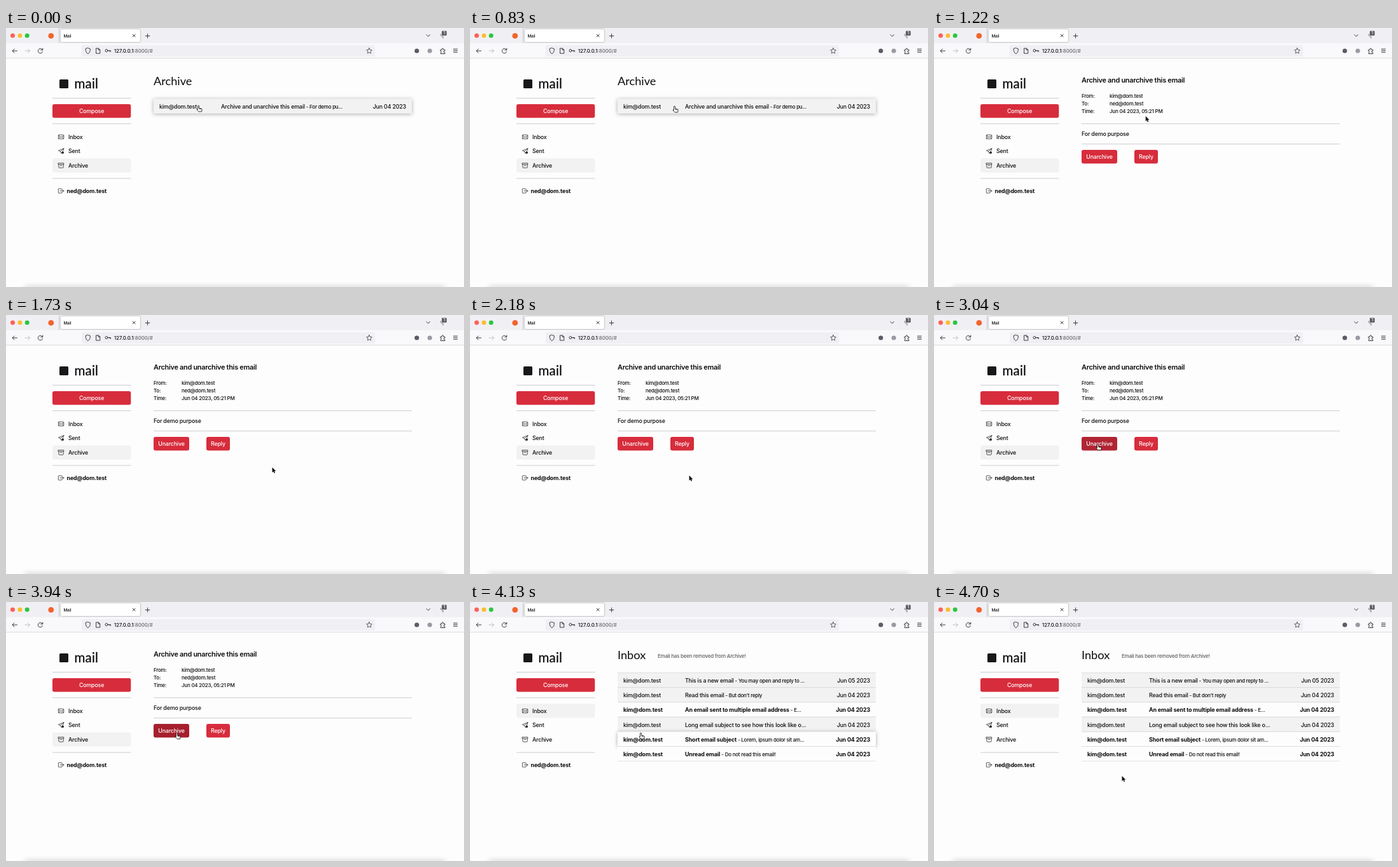
Recreate the animation shown at these times as an HTML page. Size 720x408 px, loop 4.78 s.

```html
<!DOCTYPE html>
<html lang="en">
<head>
<meta charset="utf-8">
<title>Mail</title>
<style>
  html, body { margin: 0; width: 100%; height: 100%; overflow: hidden; background: #fefdfe; }
  svg { display: block; width: 100vw; height: 100vh; }
  text { font: 500 8.9px Inter, "Open Sans", sans-serif; letter-spacing: -.02em; fill: #0c0c0e; white-space: pre; }
  .bold { font-weight: 700; letter-spacing: -.015em; }
  .small, .snippet { font-size: 8px; font-weight: 500; letter-spacing: -.03em; }
  .title { font: 18.2px Lato, sans-serif; letter-spacing: 0; }
  .brand { font: 20.5px Lato, sans-serif; letter-spacing: .2px; stroke: #0c0c0e; stroke-width: .3; }
  .subject { font-size: 10.9px; font-weight: 600; letter-spacing: -.025em; }
  .light { fill: #fff; text-anchor: middle; }
  .end { text-anchor: end; }
  .rule { stroke: #cbcbce; stroke-width: 1; }
  .icon { fill: none; stroke: #38383d; stroke-linecap: round; stroke-linejoin: round; }
  .side { stroke: #202024; stroke-width: 1.3; }
  .hover { filter: drop-shadow(0 1px 3.2px rgba(0, 0, 0, .32)); }
  .hover path { display: none; }
</style>
</head>
<body>
<svg viewBox="0 0 720 408">
  <defs>
    <linearGradient id="shade" x2="0" y2="1">
      <stop stop-color="#fefdfe"/><stop offset="1" stop-color="#e6e6e7"/>
    </linearGradient>
    <filter id="soft"><feGaussianBlur stdDeviation="4 0"/></filter>
  </defs>
  <rect width="720" height="408" fill="#fefdfe"/>
  <rect x="30" y="400" width="660" height="8" fill="url(#shade)" filter="url(#soft)"/>

  <g id="browser">
    <rect width="720" height="24" fill="#f0f0f4"/>
    <rect y="24" width="720" height="23" fill="#f9f9fb"/>
    <path d="M0 47.5H720" stroke="#dcdce0"/>
    <circle cx="10.5" cy="12" r="3.5" fill="#fe5f57"/>
    <circle cx="21.9" cy="12" r="3.5" fill="#febc2e"/>
    <circle cx="33.2" cy="12" r="3.5" fill="#28c840"/>
    <circle cx="70.8" cy="12.4" r="4.4" fill="#f2632f"/>
    <path d="M83.5 0V24" stroke="#c9c9ce"/>
    <rect x="86" y="2" width="125" height="20" rx="2.5" fill="#fff" style="filter:drop-shadow(0 0 1px #888)"/>
    <text x="90.5" y="14.6" style="font-size:6.3px">Mail</text>
    <rect x="119" y="27" width="461" height="18" rx="2.5" fill="#f0f0f4"/>
    <text x="170" y="38.8" style="font-size:7.8px;letter-spacing:0">127.0.0.1<tspan fill="#66666c">:8000/#</tspan></text>
    <g class="icon">
      <path d="M199.2 10l4 4m0-4l-4 4M219.3 12.5h6.6m-3.3-3.3v6.6M661 10.5l2.8 2.8 2.8-2.8"/>
      <path d="M17.5 36H10m3-3-3 3 3 3"/>
      <path d="M30 36h7.5m-3-3 3 3-3 3" stroke="#bfbfc4"/>
      <path d="M57.3 34.3A3.7 3.7 0 1 0 57.6 37.3M57.8 32v2.8H55"/>
      <path d="M128.8 31.5l3.6 1.4c0 4-1 6.2-3.6 7.8-2.6-1.6-3.6-3.8-3.6-7.8Z"/>
      <path d="M142 32h3.5l2.3 2.3V40H142Zm3.2.2v2.4h2.4"/>
      <circle cx="158" cy="35.6" r="2"/><path d="M160 35.6h4.5v1.8m-1.8-1.8v1.3"/>
      <path d="M571 31.6l1.3 2.8 3 .4-2.2 2.1.5 3-2.6-1.4-2.6 1.4.5-3-2.2-2.1 3-.4Z" stroke-width=".8"/>
      <path d="M683.3 34.3h2v-1.2a1.2 1.2 0 0 1 2.4 0v1.2h2.3v2h-.8a1.2 1.2 0 0 0 0 2.4h.8v1.8h-6.7v-1.8a1.2 1.2 0 0 0 0-2.4Z"/>
      <path d="M703.5 33.2h6M703.5 35.7h6M703.5 38.2h6"/>
      <path d="M683.5 10.5v-.8m0 1.2c.3 2 1.5 2.9 3.5 2.9m0 0v2.3" stroke="#777"/>
    </g>
    <circle cx="645.8" cy="36" r="3.6" fill="#5b5b66"/>
    <circle cx="666.2" cy="36" r="3.6" fill="#9a9aa2"/>
    <rect x="685" y="4.5" width="7.8" height="7.5" rx="1.3" fill="#606066"/>
    <text x="688.9" y="10.4" class="light" style="font-size:6px">1</text>
  </g>

  <g id="sidebar">
    <rect x="84" y="81" width="14" height="14" rx="1.5" fill="#18181b"/>
    <text class="brand" x="107.5" y="94.9">mail</text>
    <path class="rule" d="M73 110.5H196.5M73 150.8H196.5M73 237H196.5"/>
    <rect x="73" y="120" width="123.3" height="21.5" rx="3" fill="#d72c3c"/>
    <text class="light" x="134.6" y="134.1">Compose</text>
    <rect id="active" x="73" width="123.5" height="22.4" rx="3" fill="#f2f2f3"/>
    <text x="98" y="174.7">Inbox</text>
    <text x="98" y="197.3">Sent</text>
    <text x="98" y="219.8">Archive</text>
    <text class="bold" x="95.5" y="259.9">ned@dom.test</text>
    <g class="icon side" transform="translate(82 167) scale(.571)">
      <rect x=".6" y="2.5" width="14.8" height="11" rx="1.6"/><path d="M.8 4.8 8 9l7.2-4.2M.8 12.5 6 8M15.2 12.5 10 8"/>
    </g>
    <g class="icon side" transform="translate(82 189.5) scale(.571)">
      <path d="M15.5.6 13 8M15.5.6.8 6.2 6 9l3 5.3M15.5.6 6 9"/><circle cx="12.5" cy="12" r="2.6" fill="#202024"/>
    </g>
    <g class="icon side" transform="translate(82 212) scale(.571)">
      <path d="M.6 1.5H15.4V5H.6ZM1.6 5v7.5a2 2 0 0 0 2 2h8.8a2 2 0 0 0 2-2V5M6 8.2h4"/>
    </g>
    <g class="icon side" transform="translate(82 252) scale(.571)">
      <path d="M10.5 5V3a1 1 0 0 0-1-1h-8a1 1 0 0 0-1 1v10a1 1 0 0 0 1 1h8a1 1 0 0 0 1-1v-2M5.5 8h10M12.5 5l3 3-3 3"/>
    </g>
  </g>

  <g id="archive"><text class="title" x="232" y="89.8">Archive</text></g>

  <g id="detail">
    <text class="subject" x="232" y="85.7">Archive and unarchive this email</text>
    <text class="small" x="232" y="110.4">From:</text><text class="small" x="276" y="110.4">kim@dom.test</text>
    <text class="small" x="232" y="122.3">To:</text><text class="small" x="276" y="122.3">ned@dom.test</text>
    <text class="small" x="232" y="134.3">Time:</text><text class="small" x="276" y="134.3">Jun 04 2023, 05:21 PM</text>
    <path class="rule" d="M232 150.8H638M232 182.8H638"/>
    <text x="232" y="170.2">For demo purpose</text>
    <rect id="unarchive" x="232" y="192" width="56" height="21.6" rx="3"/>
    <text class="light" x="260" y="206.1">Unarchive</text>
    <rect x="315" y="192" width="37" height="21.6" rx="3" fill="#d72c3c"/>
    <text class="light" x="333.5" y="206.1">Reply</text>
  </g>

  <g id="inbox">
    <text class="title" x="232" y="89.8">Inbox</text>
    <text class="small" x="295" y="88" style="fill:#5c5c62">Email has been removed from Archive!</text>
  </g>

  <path id="arrow" d="M0 0V8.2L1.9 6.5 3.2 9.3 4.6 8.7 3.4 6H5.8Z" fill="#111" stroke="#fff" stroke-width=".7" paint-order="stroke"/>
  <path id="hand" d="M-1 1.1a1 1 0 0 1 2 0V4.2l3.4.7q1.5.4 1.2 2L5 9.8H.6L-2.3 6.9q-.9-1.5 1.3-.6ZM2 4.5v1.6M3.6 4.8v1.5" fill="#fff" stroke="#111" stroke-width=".85" stroke-linejoin="round"/>
</svg>
<script>
const LOOP = 4780, OPEN = 1180, PRESS = 3930, UNARCHIVED = 4060, BUTTON_HOVER = 2450;
const ROW_TOP = 111.5, ROW_HEIGHT = 23.2;
const $ = id => document.getElementById(id);

// Pointer path: time, x, y of the tip
const path = [
  [0, 302.5, 122], [30, 302.5, 122], [300, 312, 127], [540, 320, 128.5], [600, 320, 128],
  [830, 321.5, 123], [1150, 321.5, 123], [1280, 342, 152], [1450, 398, 225], [1630, 419.5, 241],
  [1730, 418.5, 240], [1920, 418.5, 240], [2050, 395, 252], [2250, 318, 253], [2430, 264, 219],
  [2460, 262.5, 212.5], [2530, 261.5, 210], [2980, 257.5, 203.5], [3040, 257.5, 203],
  [3220, 252.5, 207], [3380, 260, 211], [3520, 268, 205.5], [3580, 268.5, 206],
  [4450, 268.5, 206], [4590, 282, 245], [4700, 295.5, 274], [LOOP, 295.5, 274]
];

const lists = {
  archive: [["Archive and unarchive this email", "For demo pu...", "04", true]],
  inbox: [
    ["This is a new email", "You may open and reply to ...", "05", true],
    ["Read this email", "But don't reply", "04", true],
    ["An email sent to multiple email address", "E...", "04"],
    ["Long email subject to see how this look like o...", "", "04", true],
    ["Short email subject", "Lorem, ipsum dolor sit am...", "04"],
    ["Unread email", "Do not read this email!", "04"]
  ]
};

function rowMarkup([subject, snippet, day, read], i) {
  const top = ROW_TOP + i * ROW_HEIGHT, base = top + 15.4, weight = read ? "" : "bold";
  return `<g class="row">
    <rect x="232" y="${top}" width="406" height="${ROW_HEIGHT}" fill="${read ? "#f2f2f3" : "#fefdfe"}"/>
    <path d="M232 ${top}h406m0 ${ROW_HEIGHT}h-406" stroke="#d5d5d8" stroke-width=".7"/>
    <text class="${weight}" x="241" y="${base}">kim@dom.test</text>
    <text class="${weight}" x="338" y="${base}">${subject}${snippet && `<tspan class="snippet"> - ${snippet}</tspan>`}</text>
    <text class="end ${weight}" x="629" y="${base}">Jun ${day} 2023</text>
  </g>`;
}
for (const name in lists) $(name).insertAdjacentHTML("beforeend", lists[name].map(rowMarkup).join(""));

const clamp = v => Math.max(0, Math.min(1, v));
const mix = (a, b, u) => a + (b - a) * u;
const mixColor = (a, b, u) => `rgb(${a.map((v, i) => Math.round(mix(v, b[i], u)))})`;
const RED = [215, 44, 60], DARK = [177, 36, 51], PRESSED = [166, 31, 45];

function pointerAt(t) {
  const i = path.findIndex(p => p[0] > t);
  const [t0, x0, y0] = path[i - 1], [t1, x1, y1] = path[i], u = (t - t0) / (t1 - t0);
  return [mix(x0, x1, u), mix(y0, y1, u)];
}

function draw(t) {
  const view = t < OPEN ? "archive" : t < UNARCHIVED ? "detail" : "inbox";
  for (const id of ["archive", "detail", "inbox"]) $(id).style.display = id === view ? "" : "none";
  $("active").setAttribute("y", view === "inbox" ? 160.2 : 205.4);

  const [x, y] = pointerAt(t);
  let hot = view === "detail" && t >= BUTTON_HOVER;
  if (view !== "detail") {
    const hovered = Math.floor((y - ROW_TOP) / ROW_HEIGHT);
    $(view).querySelectorAll(".row").forEach((row, i) => {
      row.classList.toggle("hover", i === hovered);
      if (i === hovered) hot = true;
    });
  }

  const hoverColor = mixColor(RED, DARK, clamp((t - BUTTON_HOVER) / 120));
  $("unarchive").setAttribute("fill", t < PRESS ? hoverColor : `rgb(${PRESSED})`);

  for (const id of ["arrow", "hand"]) {
    $(id).style.display = (id === "hand") === hot ? "" : "none";
    $(id).setAttribute("transform", `translate(${x} ${y})`);
  }
}

const start = performance.now();
function tick() {
  draw((performance.now() - start) % LOOP);
  requestAnimationFrame(tick);
}
tick();
</script>
</body>
</html>
```
